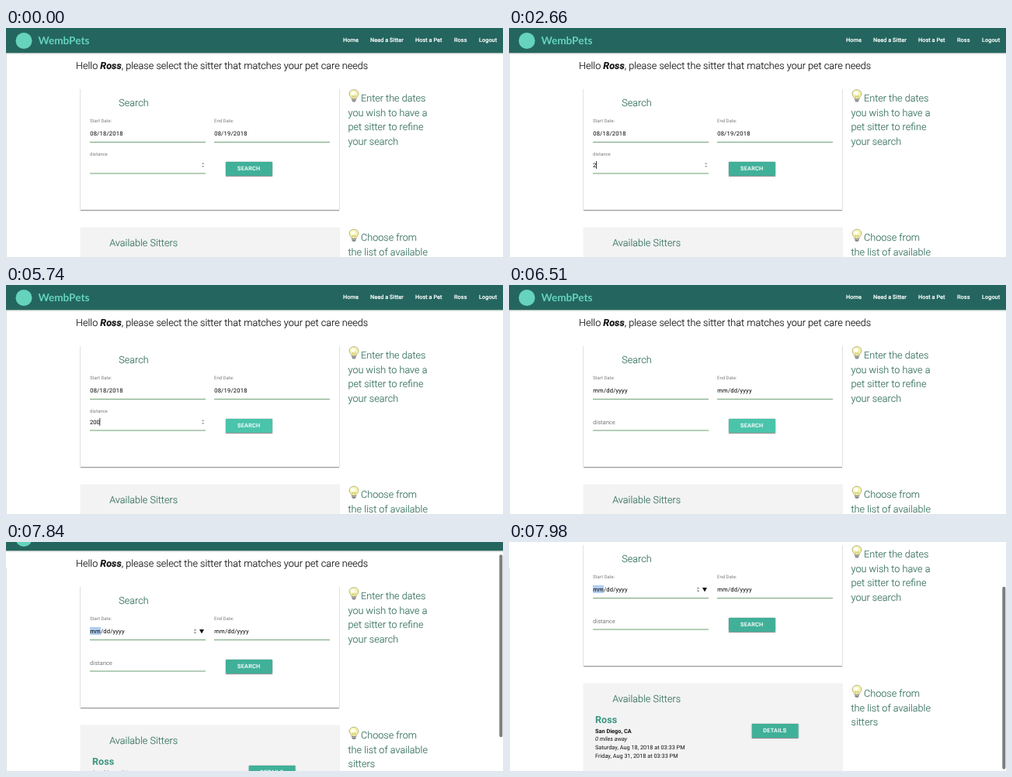
These frames come from a looping animation (640x296 px, 8 s). An HTML page:

```html
<!DOCTYPE html>
<html lang="en">
<head>
<meta charset="utf-8">
<title>Find a sitter</title>
<style>
  html, body { margin: 0; width: 100%; height: 100%; overflow: hidden; background: #fff; }
  svg { display: block; width: 640px; height: 296px; font-family: Roboto, sans-serif; text-rendering: geometricPrecision; }
  text { white-space: pre; }
  .flow { font-size: 12.65px; font-weight: 300; fill: #111; stroke: #111; stroke-width: .15; }
  .green { fill: #35705f; stroke: #35705f; }
  .nav { font-size: 7.4px; font-weight: 500; fill: #fff; stroke: #fff; stroke-width: .15; }
  .label { font-size: 6px; fill: #7c7c7c; }
  .value { font-size: 7.6px; fill: #000; }
  .date { letter-spacing: .2px; }
  .info { font-size: 7.35px; fill: #111; }
  .button { font-size: 7.3px; font-weight: 500; fill: #fff; stroke: #fff; stroke-width: .12; letter-spacing: .26px; }
  .line { stroke: #6d9f74; stroke-width: 1; }
  .shadow { fill: none; stroke: #000; stroke-opacity: .12; }
  .edge { stroke: #000; stroke-opacity: .38; }
</style>
</head>
<body>
<svg viewBox="0 0 640 296">
  <defs>
    <g id="bulb">
      <path d="M-3 5C-3 2-6 1-6-2A6 5.3 0 0 1 6-2C6 1 3 2 3 5Z" fill="#f5f2ac" stroke="#9b9a72" stroke-width=".7"/>
      <ellipse cx="-1.2" cy="-2.8" rx="3" ry="2.4" fill="#fffef0"/>
      <path d="M-1.5 4.5-2 .5 0 2 2 .5 1.5 4.5" fill="none" stroke="#b5ad62" stroke-width=".6"/>
      <path d="M-2.6 4.6H2.6V7L1.4 8.4H-1.4L-2.6 7Z" fill="#85898a"/>
      <path d="M-2.6 6H2.6" stroke="#d0d2d2" stroke-width=".6"/>
    </g>
    <path id="stepper" d="M-1.7-1 0-3.2 1.7-1ZM-1.7 1 0 3.2 1.7 1Z"/>
    <g id="buttonShadow">
      <rect class="shadow" x="-.5" y="-.3" width="61" height="19.3" rx="1.5"/>
      <path class="edge" d="M0 18.5H60"/>
    </g>
  </defs>

  <g id="page">
    <rect y="32" width="640" height="1.2" fill="#aebdba"/>
    <rect y="33.2" width="640" height="1" fill="#e6eae9"/>
    <rect width="640" height="32" fill="#24665f"/>
    <circle cx="23" cy="16.5" r="10.5" fill="#66d3bd"/>
    <text x="41.5" y="21" font-family="Lato, sans-serif" font-size="13.6" font-weight="700" fill="#66d3bd">WembPets</text>
    <g class="nav">
      <text x="434" y="18.3">Home</text>
      <text x="469" y="18.3">Need a Sitter</text>
      <text x="527" y="18.3">Host a Pet</text>
      <text x="577" y="18.3">Ross</text>
      <text x="609" y="18.3">Logout</text>
    </g>

    <text class="flow" x="90" y="53">Hello <tspan font-weight="700" font-style="italic">Ross</tspan>, please select the sitter that matches your pet care needs</text>

    <path class="shadow" d="M95.5 79V235M429.5 79V235M96 236.5H429"/>
    <path class="edge" d="M96 235.5H429"/>
    <text class="flow green" x="145.2" y="101.3">Search</text>
    <text class="label" x="108" y="122">Start Date:</text>
    <text class="label" x="268" y="122">End Date:</text>
    <rect id="highlight" x="108" y="131" width="14" height="10" fill="#b0cdf0"/>
    <text class="value date" id="start" x="108.2" y="139"></text>
    <text class="value date" id="end" x="268.2" y="139"></text>
    <g id="dateTools">
      <use href="#stepper" x="243.5" y="136.5" fill="#858585"/>
      <path d="M249 134H255L252 139.5Z" fill="#111"/>
    </g>
    <path class="line" d="M108 147.6H257M268 147.6H417M108 188H257"/>
    <text class="label" id="distanceLabel" x="108">distance</text>
    <text class="value" id="distance" x="108" y="179.6"></text>
    <rect id="caret" y="172" width=".8" height="10" fill="#111"/>
    <use id="distanceTools" href="#stepper" x="253.7" y="177"/>
    <use href="#buttonShadow" x="283" y="173"/>
    <rect id="search" x="283" y="173" width="60" height="18" rx="1"/>
    <text class="button" x="298" y="184.4">SEARCH</text>

    <rect x="95.5" y="257.5" width="334.5" height="140" rx="1.5" fill="#f3f3f3"/>
    <text class="flow green" x="133.2" y="282">Available Sitters</text>
    <text x="111" y="308.5" font-size="12.6" font-weight="700" fill="#3a9480">Ross</text>
    <g class="info">
      <text x="111" y="321.6" font-weight="700">San Diego, CA</text>
      <text x="111" y="332.3" font-style="italic">0 miles away</text>
      <text x="111" y="343.3">Saturday, Aug 18, 2018 at 03:33 PM</text>
      <text x="111" y="354.2">Friday, Aug 31, 2018 at 03:33 PM</text>
    </g>
    <use href="#buttonShadow" x="312.7" y="310"/>
    <rect x="312.7" y="310" width="60" height="18" rx="1" fill="#40b099"/>
    <text class="button" x="327.3" y="321.4">DETAILS</text>

    <use href="#bulb" x="448" y="87"/>
    <use href="#bulb" x="448" y="267.5"/>
    <g class="flow green">
      <text x="457" y="95">Enter the dates</text>
      <text x="440.5" y="113.5">you wish to have a</text>
      <text x="440.5" y="132">pet sitter to refine</text>
      <text x="440.5" y="150.5">your search</text>
      <text x="457" y="275.3">Choose from</text>
      <text x="440.5" y="293.8">the list of available</text>
      <text x="440.5" y="312.3">sitters</text>
    </g>
  </g>
  <rect y="33" width=".8" height="263" fill="#d9d9d9"/>
  <rect id="scrollbar" x="635.3" width="4" height="236" rx="2" fill="#7d7d7d"/>
</svg>
<script>
  const LOOP = 8000, RESET = 6090, FOCUS = 7070;
  const $ = id => document.getElementById(id);
  const show = (id, on) => $(id).setAttribute('visibility', on ? 'visible' : 'hidden');
  const ramp = (t, from, length) => Math.min(1, Math.max(0, (t - from) / length));

  // Latest value whose time has come.
  const at = (t, steps) => steps.filter(([time]) => t >= time).pop()[1];

  const values = [[0, ''], [840, '1'], [1120, '2'], [4340, '20'], [4550, '200'], [RESET, '']];
  const carets = [[0, 0], [840, 1], [1785, 0], [2345, 1], [2800, 0], [3325, 1], [3780, 0],
                  [4300, 1], [5110, 0], [5600, 1], [RESET, 0]];
  const scrolls = [[0, 0], [7840, 21], [7910, 54], [7980, 75]];

  function draw(t) {
    const cleared = t >= RESET, focused = t >= FOCUS;
    const value = at(t, values), scroll = at(t, scrolls);

    $('start').textContent = cleared ? 'mm/dd/yyyy' : '08/18/2018';
    $('end').textContent = cleared ? 'mm/dd/yyyy' : '08/19/2018';
    show('highlight', focused);
    show('dateTools', focused);

    $('distance').textContent = value;
    $('caret').setAttribute('x', 108 + value.length * 4.15);
    show('caret', at(t, carets));
    show('distanceTools', !cleared);
    $('distanceTools').setAttribute('fill', t >= 1050 && t < 1400 ? '#3768c8' : '#a3a5ab');

    const drop = ramp(t, RESET, 200);
    $('distanceLabel').setAttribute('y', 165 + drop * 14.6);
    $('distanceLabel').style.fontSize = 6 + drop * 1.6 + 'px';

    const hover = ramp(t, 5250, 300) - ramp(t, FOCUS - 210, 300);
    $('search').setAttribute('fill', `rgb(${64 + 10 * hover},${176 + 20 * hover},${153 + 18 * hover})`);

    $('page').setAttribute('transform', `translate(0 ${-scroll})`);
    $('scrollbar').setAttribute('y', scroll * .77);
    show('scrollbar', scroll);
  }

  const began = performance.now();
  function tick() {
    draw((performance.now() - began) % LOOP);
    requestAnimationFrame(tick);
  }
  tick();
</script>
</body>
</html>
```
